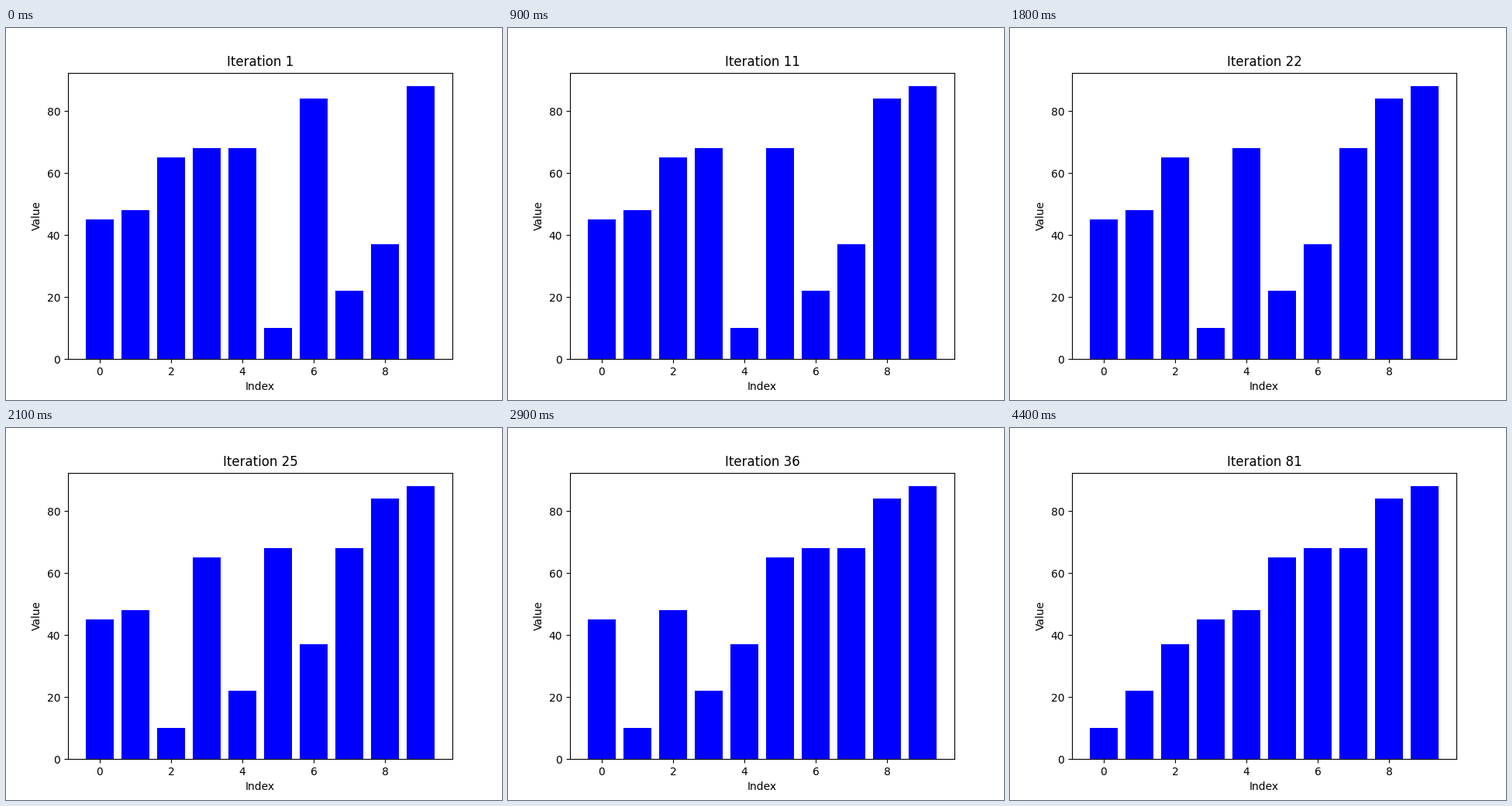
A matplotlib script that plays this animation: 640x480 px, repeating every 4.5 s.

```python
import matplotlib.pyplot as plt
from matplotlib.animation import FuncAnimation

VALUES = [45, 48, 65, 68, 68, 10, 84, 22, 37, 88]
STEP_MS = 100


def bubble_sort(values):
    """Return (iteration, state) after every comparison of a bubble sort."""
    data, n, steps = list(values), len(values), []
    for i in range(n):
        for j in range(n - i - 1):
            if data[j] > data[j + 1]:
                data[j], data[j + 1] = data[j + 1], data[j]
            steps.append((i * n + j + 1, data.copy()))
    return steps


steps = bubble_sort(VALUES)

fig, ax = plt.subplots(figsize=(6.4, 4.8), dpi=100)
bars = ax.bar(range(len(VALUES)), VALUES, color="blue")
ax.set_xlabel("Index")
ax.set_ylabel("Value")
title = ax.set_title("Iteration 1")


def update(k):
    iteration, state = steps[k]
    for bar, height in zip(bars, state):
        bar.set_height(height)
    title.set_text(f"Iteration {iteration}")
    return [*bars, title]


anim = FuncAnimation(fig, update, frames=len(steps), interval=STEP_MS,
                     repeat=True, repeat_delay=0, blit=False)

plt.show()
```
